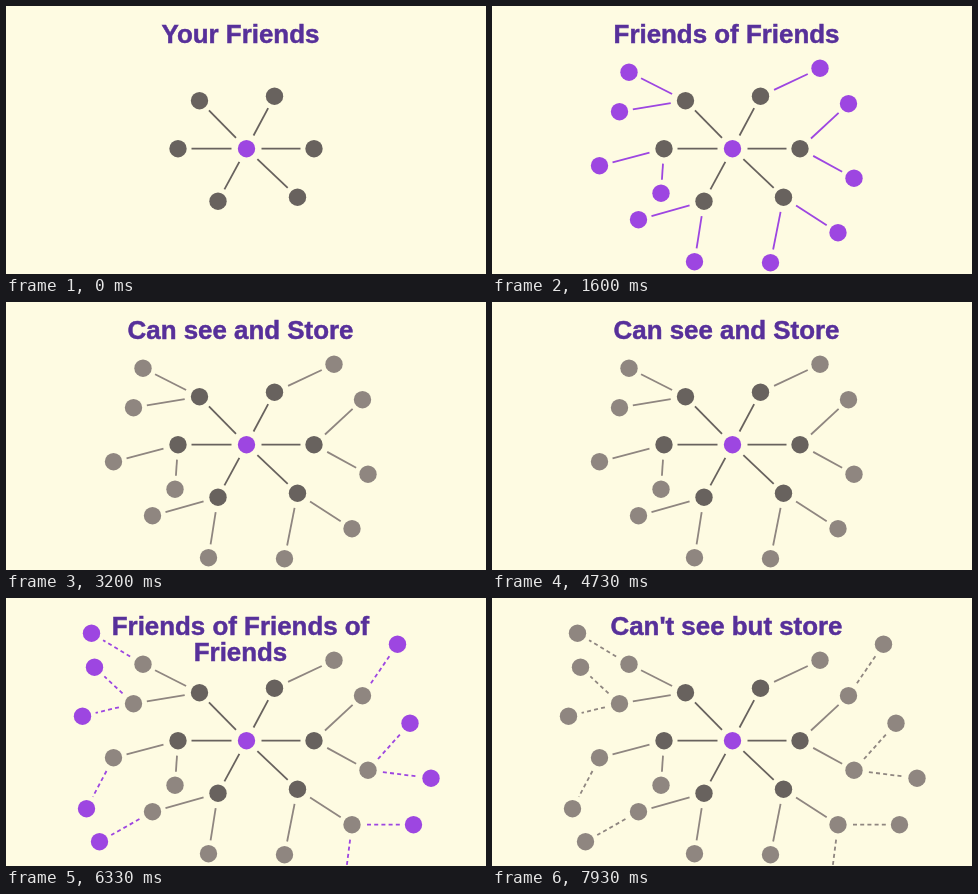
Animation of 480 by 268 pixels, one loop 8 s. Source, as an HTML page:

```html
<!DOCTYPE html>
<html lang="en">
<head>
<meta charset="utf-8">
<title>Friends network</title>
<style>
  html, body { margin: 0; height: 100%; overflow: hidden; background: #fefbe2; }
  svg { display: block; width: 100%; height: 100%; }
  text {
    font: bold 25.9px "Liberation Sans", Arial, sans-serif;
    fill: #57309a; stroke: #57309a; stroke-width: .5; text-anchor: middle;
  }
  g { fill: var(--tone); stroke: var(--tone); stroke-width: 1.8; }
  g.far line { stroke-dasharray: 4 3.2; }
  circle { stroke: none; }
</style>
</head>
<body>
<svg viewBox="0 .3 480 268">
  <g class="me"></g>
  <g class="inner"></g>
  <g class="outer"></g>
  <g class="far"></g>
  <text x="234.5" y="37.7"></text>
  <text x="234.5" y="63.7"></text>
</svg>
<script>
const PURPLE = '#9d46e1', GRAY = '#8f8680', DARK = '#68625e';
const STEP = 1600, RADIUS = 8.7, PARENT_GAP = 15, CHILD_GAP = 13.5;
const RINGS = ['me', 'inner', 'outer', 'far'];

// Each person: x, y, then their friends
const network = [240.5, 143,
  [172, 143, [107.5, 160, [80.5, 211]], [169, 187.5]],
  [193.5, 95, [137, 66.5, [85.5, 35.5]], [127.5, 106, [88.5, 69.5], [76.5, 118.5]]],
  [268.5, 90.5, [328, 62.5]],
  [308, 143, [356.5, 98, [391.5, 46.5]], [362, 172.5, [404, 125.5], [425, 180.5]]],
  [291.5, 191.5, [346, 227, [407.5, 227], [338, 290]], [278.5, 257]],
  [212, 195.5, [202.5, 256], [146.5, 214, [93.5, 244]]]
];

const scenes = [
  { title: ['Your Friends'] },
  { title: ['Friends of Friends'], outer: PURPLE },
  { title: ['Can see and Store'], outer: GRAY },
  { title: ['Friends of Friends of', 'Friends'], outer: GRAY, far: PURPLE },
  { title: ["Can't see but store"], outer: GRAY, far: GRAY }
];

const groups = RINGS.map(name => document.querySelector('.' + name));
const titleLines = document.querySelectorAll('text');

function add(parent, tag, attributes) {
  const element = document.createElementNS('http://www.w3.org/2000/svg', tag);
  for (const key in attributes) element.setAttribute(key, attributes[key]);
  parent.append(element);
}

function addPerson([x, y, ...friends], depth = 0, parent) {
  const group = groups[depth];
  if (parent) {
    const [px, py] = parent;
    const length = Math.hypot(x - px, y - py);
    const ux = (x - px) / length, uy = (y - py) / length;
    add(group, 'line', {
      x1: px + ux * PARENT_GAP, y1: py + uy * PARENT_GAP,
      x2: x - ux * CHILD_GAP, y2: y - uy * CHILD_GAP
    });
  }
  add(group, 'circle', { cx: x, cy: y, r: RADIUS });
  friends.forEach(friend => addPerson(friend, depth + 1, [x, y]));
}

function draw(time) {
  const scene = scenes[Math.floor(time / STEP) % scenes.length];
  const tones = [PURPLE, DARK, scene.outer, scene.far];
  titleLines.forEach((line, i) => line.textContent = scene.title[i] || '');
  groups.forEach((group, i) => group.style.setProperty('--tone', tones[i] || 'none'));
}

addPerson(network);
const start = performance.now();
function tick() {
  draw(performance.now() - start);
  requestAnimationFrame(tick);
}
tick();
</script>
</body>
</html>
```
